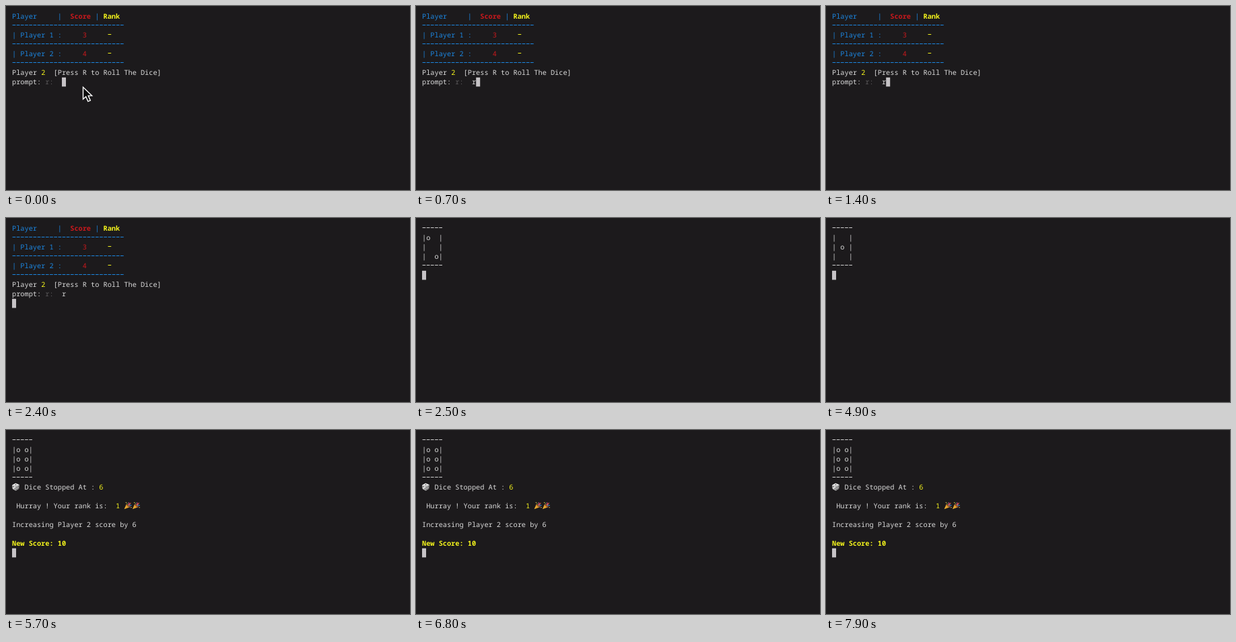
An HTML page that plays this animation: 600 px wide and 275 px high, repeating every 8000 ms.

```html
<!DOCTYPE html>
<html lang="en">
<head>
<meta charset="utf-8">
<title>Dice game in a terminal</title>
<style>
  html, body { margin: 0; width: 100%; height: 100%; overflow: hidden; background: #1c1a1c; }
  svg { display: block; width: 600px; height: 275px; }
  text {
    font: 10.28px "Noto Sans Mono", "DejaVu Sans Mono", monospace;
    white-space: pre;
    text-rendering: geometricPrecision;
    fill: #dadada;
  }
  .blue { fill: #1c86e0; }
  .red { fill: #c9191d; }
  .yellow { fill: #f4f41c; }
  .dim { fill: #5c5a5c; }
  .bold { font-weight: 600; }
  .rule { stroke: #1c86e0; stroke-width: 1.1; stroke-dasharray: 4.7 1.468; }
  .rule.white { stroke: #cfcfcf; }
  .rule.gold { stroke: #f4f41c; }

  /* Everything shares one 8 s clock with hard cuts. */
  .t { animation: 8s step-end infinite; }
  .pointer { animation-name: pointer; }
  .typed { animation-name: typed; }
  .board { animation-name: board; }
  .dice { animation-name: dice; }
  .result { animation-name: result; }
  .diag { animation-name: diag; }
  .anti { animation-name: anti; }
  .mid { animation-name: mid; }
  .caret { fill: #c6c3c6; animation-name: caret; }

  @keyframes pointer { 0% { opacity: 1 } 3.75%, 100% { opacity: 0 } }
  @keyframes typed { 0% { opacity: 0 } 3.75%, 100% { opacity: 1 } }
  @keyframes board { 0% { opacity: 1 } 31.25%, 100% { opacity: 0 } }
  @keyframes dice { 0% { opacity: 0 } 31.25%, 100% { opacity: 1 } }
  @keyframes result { 0% { opacity: 0 } 71.25%, 100% { opacity: 1 } }
  @keyframes diag { 0% { opacity: 1 } 61.25% { opacity: 0 } 71.25%, 100% { opacity: 1 } }
  @keyframes anti { 0% { opacity: 0 } 41.25% { opacity: 1 } 51.25% { opacity: 0 } 71.25%, 100% { opacity: 1 } }
  @keyframes mid { 0% { opacity: 0 } 51.25% { opacity: 1 } 71.25%, 100% { opacity: 0 } }
  @keyframes caret {
    0% { transform: translate(74px, 98px) }
    3.75% { transform: translate(80.2px, 98px) }
    21.25% { transform: translate(0, 112px) }
    31.25% { transform: translate(0, 70px) }
    71.25%, 100% { transform: translate(0, 168px) }
  }
</style>
</head>
<body>
<svg viewBox="0 0 600 275">
  <defs>
    <g id="popper">
      <path d="M.6 11.2 4 3.4 8.8 8.2Z" fill="#f2b632"/>
      <path d="M2.4 7.2 5 9.7M3.4 5 6.9 8.8" stroke="#b8672a" stroke-width=".8"/>
      <ellipse cx="6.4" cy="5.8" rx="1.3" ry="3.3" transform="rotate(-45 6.4 5.8)" fill="#8a5524"/>
      <path d="M6.5 5.3Q8.5 3.8 7.2 1.2" fill="none" stroke="#d9508f" stroke-width="1.1"/>
      <path d="M7.5 6Q9.2 4.6 11.4 5.8" fill="none" stroke="#4b9be0" stroke-width="1.1"/>
      <path d="M7.4 5 10.4 1.8" stroke="#e9584a" stroke-width="1.1"/>
      <g fill="#e8c94a">
        <circle cx="3.3" cy="1.4" r=".7"/><circle cx="10.9" cy="8.8" r=".7"/>
      </g>
      <circle cx="5" cy="2.4" r=".7" fill="#62b85a"/>
      <circle cx="9.4" cy="7.5" r=".6" fill="#d9508f"/>
    </g>
  </defs>

  <g class="t board">
    <text x="9" y="18.7" class="blue">Player     |  <tspan class="red bold">Score</tspan> | <tspan class="yellow bold">Rank</tspan></text>
    <path class="rule" d="M9.6 28.5H175.5M9.6 56.5H175.5M9.6 84.5H175.5"/>
    <text x="9" y="46.7" class="blue">| Player 1 :     <tspan class="red">3</tspan></text>
    <text x="9" y="74.7" class="blue">| Player 2 :     <tspan class="red">4</tspan></text>
    <path class="rule gold" d="M151.5 42.5h4.7M151.5 70.5h4.7"/>
    <text x="9" y="102.7">Player <tspan class="yellow">2</tspan>  [Press R to Roll The Dice]</text>
    <text x="9" y="116.7">prompt: <tspan class="dim">r:</tspan></text>
    <text class="t typed" x="83" y="116.7">r</text>
  </g>

  <g class="t dice">
    <path class="rule white" d="M9.6 14.5h30M9.6 70.5h30"/>
    <text x="9" y="32.7">|   |</text>
    <text x="9" y="46.7">|   |</text>
    <text x="9" y="60.7">|   |</text>
    <g class="t diag"><text x="15.17" y="32.7">o</text><text x="27.5" y="60.7">o</text></g>
    <g class="t anti"><text x="27.5" y="32.7">o</text><text x="15.17" y="60.7">o</text></g>
    <text class="t mid" x="21.34" y="46.7">o</text>
  </g>

  <g class="t result">
    <text x="15.17" y="46.7">o o</text>
    <g transform="translate(9 79.4)">
      <path d="M5.3 0 10.8 2.4 5.6 5 0 2.8Z" fill="#f2f2f2"/>
      <path d="M0 2.8 5.6 5V11.4L.7 8.6Z" fill="#d2d2d2"/>
      <path d="M5.6 5 10.8 2.4 10.2 8.4 5.6 11.4Z" fill="#b4b4b4"/>
      <g fill="#343234">
        <ellipse cx="5.4" cy="2.5" rx="1.2" ry=".7"/>
        <circle cx="1.6" cy="5" r=".75"/><circle cx="4.1" cy="8.6" r=".75"/>
        <circle cx="7" cy="6.2" r=".65"/><circle cx="9.3" cy="5" r=".65"/>
        <circle cx="6.9" cy="9" r=".65"/><circle cx="9" cy="7.6" r=".65"/>
      </g>
    </g>
    <text x="9" y="88.7">   Dice Stopped At : <tspan class="yellow">6</tspan></text>
    <text x="9" y="116.7"> Hurray ! Your rank is:  <tspan class="yellow">1</tspan></text>
    <use href="#popper" x="175" y="107"/>
    <use href="#popper" x="187.3" y="107"/>
    <text x="9" y="144.7">Increasing Player 2 score by 6</text>
    <text x="9" y="172.7" class="yellow bold">New Score: 10</text>
  </g>

  <rect class="t caret" x="9" y="8.8" width="6" height="13.6"/>
  <path class="t pointer" d="M114.5 121.3V139.2L118.7 135.4 121.8 142.6 125.3 141.1 122.2 134.1H127.6Z" fill="#0b0b0b" stroke="#fff" stroke-width="1.4"/>
</svg>
</body>
</html>
```
